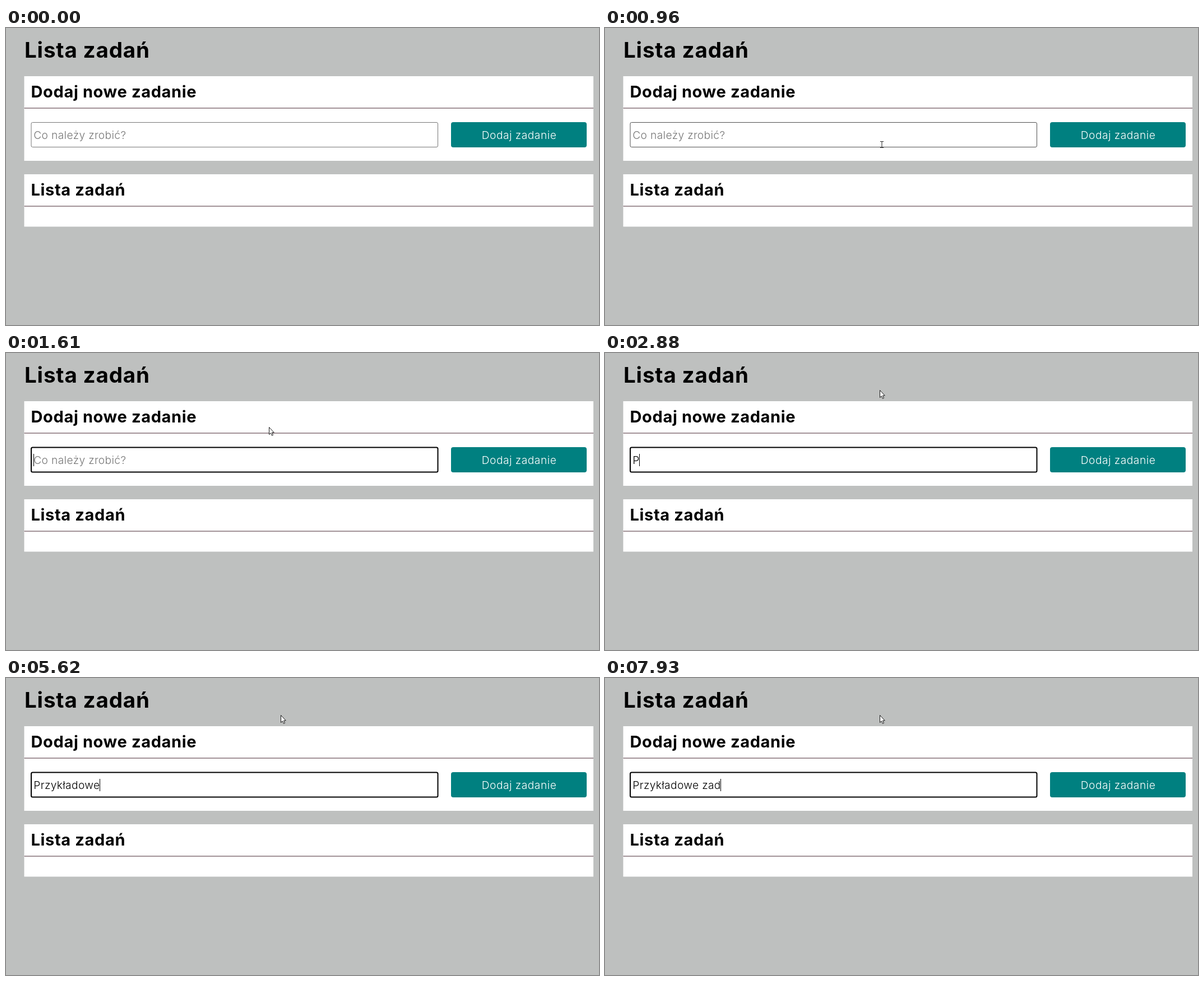
Recreate the animation shown at these times as an HTML page. Size 1058 px wide and 530 px high, loop 8000 ms.

```html
<!DOCTYPE html>
<html lang="pl">
<head>
<meta charset="utf-8">
<title>Lista zadań</title>
<style>
  html, body { margin: 0; width: 100%; height: 100%; overflow: hidden; background: #bec0bf; }
  svg { display: block; width: 1058px; height: 530px; }
  text { font-family: Inter, "Open Sans", sans-serif; white-space: pre; }
  .title, .heading { font-weight: 700; letter-spacing: .022em; }
  .title { font-size: 38.5px; }
  .heading { font-size: 29px; }
  .field, .button { font-size: 19.2px; font-weight: 300; letter-spacing: .35px; }
  .button { letter-spacing: .5px; fill: #fff; text-anchor: middle; }
  .panel { fill: #fff; }
  .rule { fill: #a39398; }
</style>
</head>
<body>
<svg viewBox="0 0 1058 530">
  <text class="title" x="33" y="53">Lista zadań</text>

  <rect class="panel" x="32.5" y="86" width="1015.5" height="151"/>
  <rect class="rule" x="32.5" y="142" width="1015.5" height="2"/>
  <text class="heading" x="44.5" y="124">Dodaj nowe zadanie</text>
  <rect id="box" x="45" y="168.5" width="725.5" height="44" rx="2.5" fill="#fff"/>
  <text id="entry" class="field" x="49.3" y="197.5"></text>
  <rect id="caret" y="180" width="1" height="22"/>
  <rect x="794" y="168" width="242" height="45" rx="4" fill="#008080"/>
  <text class="button" x="915.5" y="197.5">Dodaj zadanie</text>

  <rect class="panel" x="32.5" y="261" width="1015.5" height="93.5"/>
  <rect class="rule" x="32.5" y="317" width="1015.5" height="2"/>
  <text class="heading" x="44.5" y="298.5">Lista zadań</text>

  <path id="arrow" d="M.5 .5V13.5L3.4 10.8 5.4 15.3 7.5 14.4 5.5 10H9.3Z" fill="#fff" stroke="#000" stroke-width=".9"/>
  <path id="beam" d="M-3 -5.5H-1L0 -5 1 -5.5H3M0 -5V5M-3 5.5H-1L0 5 1 5.5H3" fill="none" stroke="#222"/>
</svg>
<script>
const LOOP = 8000, FOCUS = 1390;
const PLACEHOLDER = 'Co należy zrobić?', TASK = 'Przykładowe zad';
// One time per typed character
const KEYS = [2880, 3410, 3560, 3770, 4240, 4830, 4990, 5250, 5370, 5480, 5620, 6050, 7430, 7560, 7930];
const CARET_OFF = [[1910, 2410], [4780, 4830], [6560, 7100]];
// Pointer waypoints: time, x, y
const PATH = [
  [340, 887, 515], [550, 604, 308], [800, 518, 228], [1130, 468, 186], [1210, 465, 183],
  [1520, 465, 183], [1610, 469, 132], [1750, 484, 85], [1910, 490, 66]
];

const [box, entry, caret, arrow, beam] =
  ['box', 'entry', 'caret', 'arrow', 'beam'].map(id => document.getElementById(id));

function setAttributes(node, values) {
  for (const name in values) node.setAttribute(name, values[name]);
}

function show(node, visible) {
  node.style.display = visible ? '' : 'none';
}

function pointerAt(time) {
  const next = PATH.findIndex(point => point[0] > time);
  if (next < 0) return PATH.at(-1).slice(1);
  const [t0, x0, y0] = PATH[next - 1], [t1, x1, y1] = PATH[next];
  const part = (time - t0) / (t1 - t0);
  return [Math.round(x0 + (x1 - x0) * part), Math.round(y0 + (y1 - y0) * part)];
}

function drawField(time, hovered) {
  const focused = time >= FOCUS;
  setAttributes(box, {
    stroke: focused ? '#000' : hovered ? '#4f4f4f' : '#767676',
    'stroke-width': focused ? 2 : 1
  });

  const typed = TASK.slice(0, KEYS.filter(key => key <= time).length);
  entry.textContent = typed || PLACEHOLDER;
  entry.setAttribute('fill', typed ? '#000' : '#757575');

  const blinkedOff = CARET_OFF.some(([from, to]) => time >= from && time < to);
  show(caret, focused && !blinkedOff);
  caret.setAttribute('x', 49 + Math.round(typed ? entry.getComputedTextLength() : 0));
}

function drawPointer(time, x, y, hovered) {
  const visible = time >= PATH[0][0];
  show(arrow, visible && !hovered);
  show(beam, visible && hovered);
  arrow.setAttribute('transform', `translate(${x} ${y})`);
  beam.setAttribute('transform', `translate(${x} ${y})`);
}

function draw() {
  const time = performance.now() % LOOP;
  const [x, y] = pointerAt(Math.max(time, PATH[0][0]));
  const hovered = x > 44 && x < 771 && y > 167 && y < 213;
  drawField(time, hovered);
  drawPointer(time, x, y, hovered);
  requestAnimationFrame(draw);
}

draw();
</script>
</body>
</html>
```
